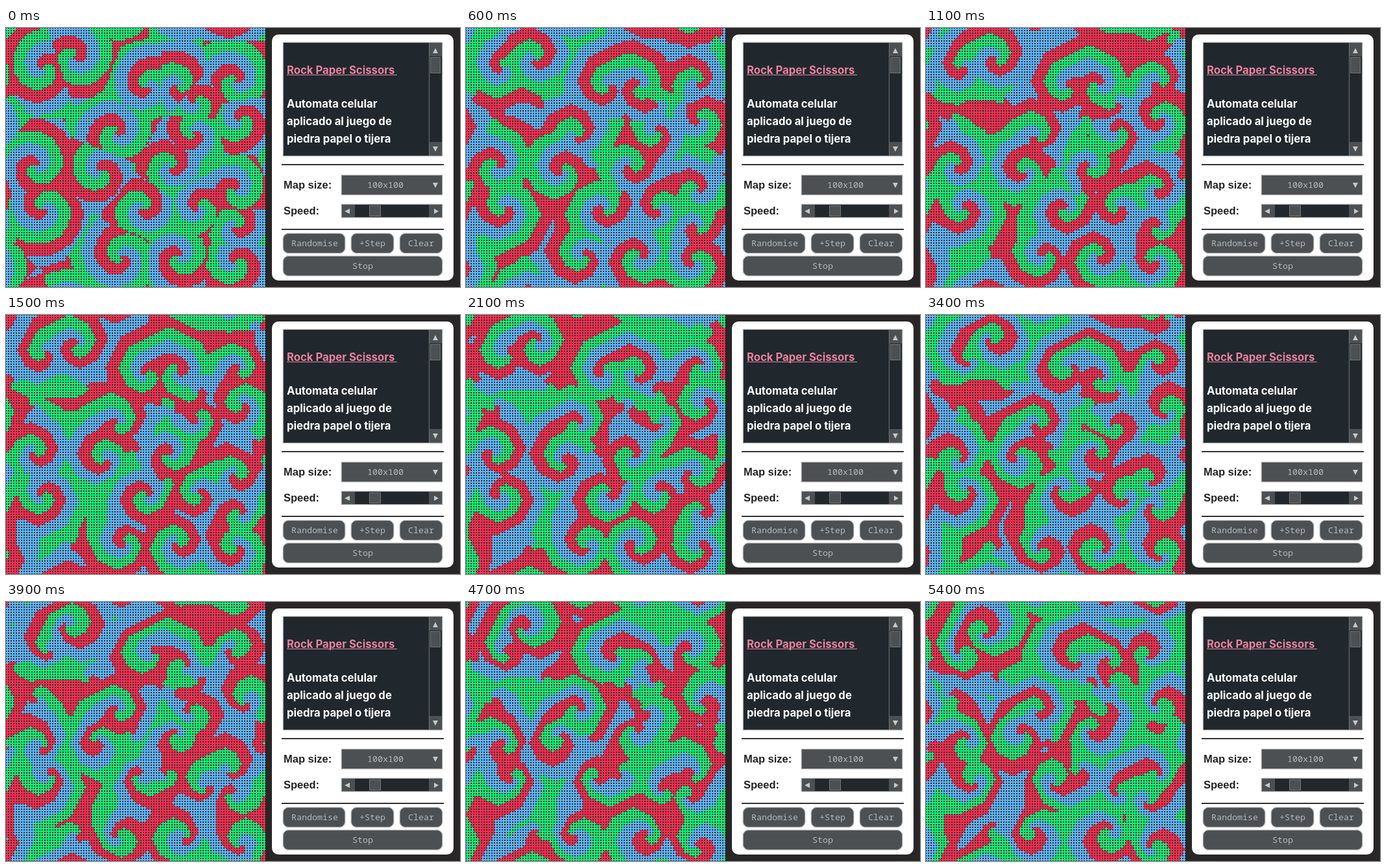
Write an HTML page with a canvas that moves like this. It is 700 by 400 pixels and loops after 5500 ms.

```html
<!DOCTYPE html>
<html lang="es">
<head>
<meta charset="utf-8">
<title>Rock Paper Scissors</title>
<style>
  html, body { margin: 0; width: 100%; height: 100%; overflow: hidden; background: #282626; }
  canvas { position: absolute; left: 0; top: 0; }
  svg { position: absolute; left: 400px; top: 0; }
  .title { font: 700 16.7px Inter, sans-serif; fill: #fff; }
  .label { font: bold 16.5px "Liberation Sans", Arial, sans-serif; fill: #222; }
  .mono { font: 13.33px "Noto Sans Mono", monospace; fill: #b4b8b8; }
  .box, .dark { stroke: #999; filter: drop-shadow(0 0 1px rgba(0, 0, 0, .25)); }
  .box, .part, .thumb { fill: #4c5052; }
  .dark { fill: #21282d; }
  .thumb { stroke: #707678; }
  .arrow { fill: #c4c8c8; }
</style>
</head>
<body>
<canvas id="grid" width="400" height="400"></canvas>
<svg width="300" height="400" viewBox="400 0 300 400">
  <defs><clipPath id="clip"><rect x="438" y="318" width="73" height="30"/></clipPath></defs>
  <rect x="400" width="300" height="400" fill="#282626"/>
  <rect x="410" y="10" width="280" height="380" rx="10" fill="#fff"/>

  <rect class="dark" x="427.5" y="22.5" width="245" height="175"/>
  <g class="title">
    <text x="433" y="71" style="fill:#e8829e">Rock Paper Scissors</text>
    <text x="433" y="123">Automata celular</text>
    <text x="433" y="150">aplicado al juego de</text>
    <text x="433" y="177">piedra papel o tijera</text>
  </g>
  <rect x="433" y="72" width="170" height="1" fill="#e8829e"/>
  <path d="M652.5 23V197" stroke="#707678"/>
  <rect class="part" x="653" y="23" width="19" height="21"/>
  <rect class="part" x="653" y="176" width="19" height="21"/>
  <rect class="thumb" x="654.5" y="45.5" width="15" height="24"/>
  <path class="arrow" d="M658 39h8l-4-8zM658 183h8l-4 8z"/>

  <path d="M425 211H675M425 311H675" stroke="#333" stroke-width="2"/>
  <text class="label" x="428" y="248">Map size:</text>
  <rect class="box" x="517.5" y="227.5" width="155" height="30"/>
  <text class="mono" x="557" y="247">100x100</text>
  <path class="arrow" d="M658 239h8l-4 8z"/>

  <text class="label" x="428" y="288">Speed:</text>
  <rect class="dark" x="517.5" y="272.5" width="155" height="20"/>
  <rect class="part" x="518" y="273" width="20" height="19"/>
  <rect class="part" x="652" y="273" width="20" height="19"/>
  <rect class="thumb" x="560.5" y="274.5" width="17" height="16"/>
  <path class="arrow" d="M530 279v8l-8-4zM660 279v8l7-4z"/>

  <rect class="box" x="427.5" y="317.5" width="95" height="30" rx="8"/>
  <rect class="box" x="532.5" y="317.5" width="65" height="30" rx="8"/>
  <rect class="box" x="607.5" y="317.5" width="65" height="30" rx="8"/>
  <rect class="box" x="427.5" y="352.5" width="245" height="30" rx="8"/>
  <g class="mono">
    <text x="440" y="337" clip-path="url(#clip)">Randomise</text>
    <text x="545" y="337">+Step</text>
    <text x="620" y="337">Clear</text>
    <text x="534" y="372">Stop</text>
  </g>
</svg>
<script>
const SIZE = 100, CELL = 4, LOOP = 5500, TICK = 100;
const WAVELENGTH = 15;   // cells from one red front to the next
const COLORS = ['#fc2e54', '#5cb8fa', '#12f07a'];   // each is eaten by the one before it
const ctx = document.getElementById('grid').getContext('2d');

// Spiral centres: column, row and the direction (degrees) in which red leaves.
const clockwise = [
  [26, 11, 45], [66, 22, 180], [88, 20, 0], [42, 40, 20], [11, 53, -60],
  [63, 53, 90], [88, 62, -45], [52, 69, 120], [88, 76, 120], [66, 88, -60],
];
const counter = [
  [14, 15, 200], [54, 22, 60], [73, 28, 180], [90, 35, 200], [72, 40, 0],
  [36, 55, 230], [14, 69, 60], [74, 69, 150], [44, 88, 0], [88, 90, 200],
];
const withSpin = (list, spin) => list.map(([x, y, red]) => ({ x, y, spin, red }));
const cores = [...withSpin(clockwise, 1), ...withSpin(counter, -1)];

const wrap = d => d - SIZE * Math.round(d / SIZE);

// Every cell belongs to the spiral wave of its nearest centre.
function startColor(x, y) {
  let best = Infinity, phase = 0;
  for (const core of cores) {
    const dx = wrap(x - core.x), dy = wrap(y - core.y), r = Math.hypot(dx, dy);
    if (r >= best) continue;
    best = r;
    const turn = Math.atan2(dy, dx) / (2 * Math.PI) - core.red / 360;
    phase = r / WAVELENGTH + core.spin * turn + 1 / 6;
  }
  return Math.floor(3 * (phase - Math.floor(phase))) % 3;
}

// A cell is eaten when at least three of its eight neighbours beat it.
function advance(cells) {
  return cells.map((own, i) => {
    const x = i % SIZE, y = Math.floor(i / SIZE), eater = (own + 2) % 3;
    let count = 0;
    for (let dy = -1; dy <= 1; dy++) for (let dx = -1; dx <= 1; dx++) {
      const ny = (y + dy + SIZE) % SIZE, nx = (x + dx + SIZE) % SIZE;
      if (cells[ny * SIZE + nx] === eater) count++;
    }
    return count >= 3 ? eater : own;
  });
}

function draw(cells) {
  ctx.fillStyle = '#282626';
  ctx.fillRect(0, 0, 400, 400);
  cells.forEach((color, i) => {
    const x = i % SIZE * CELL, y = Math.floor(i / SIZE) * CELL;
    ctx.fillStyle = COLORS[color];
    ctx.fillRect(x + 1, y, 2, 4);
    ctx.fillRect(x, y + 1, 4, 2);
  });
}

function generationAt(time) {
  const g = Math.floor(time / TICK);
  if (g >= 24 && g < 28) return 24;   // the display pauses here
  return g === 29 ? 28 : g;
}

const start = Uint8Array.from({ length: SIZE * SIZE },
  (_, i) => startColor(i % SIZE, Math.floor(i / SIZE)));
const history = [start];
while (history.length < LOOP / TICK) history.push(advance(history[history.length - 1]));

let shown = -1;
function frame() {
  const g = generationAt(performance.now() % LOOP);
  if (g !== shown) draw(history[shown = g]);
  requestAnimationFrame(frame);
}
frame();
</script>
</body>
</html>
```
